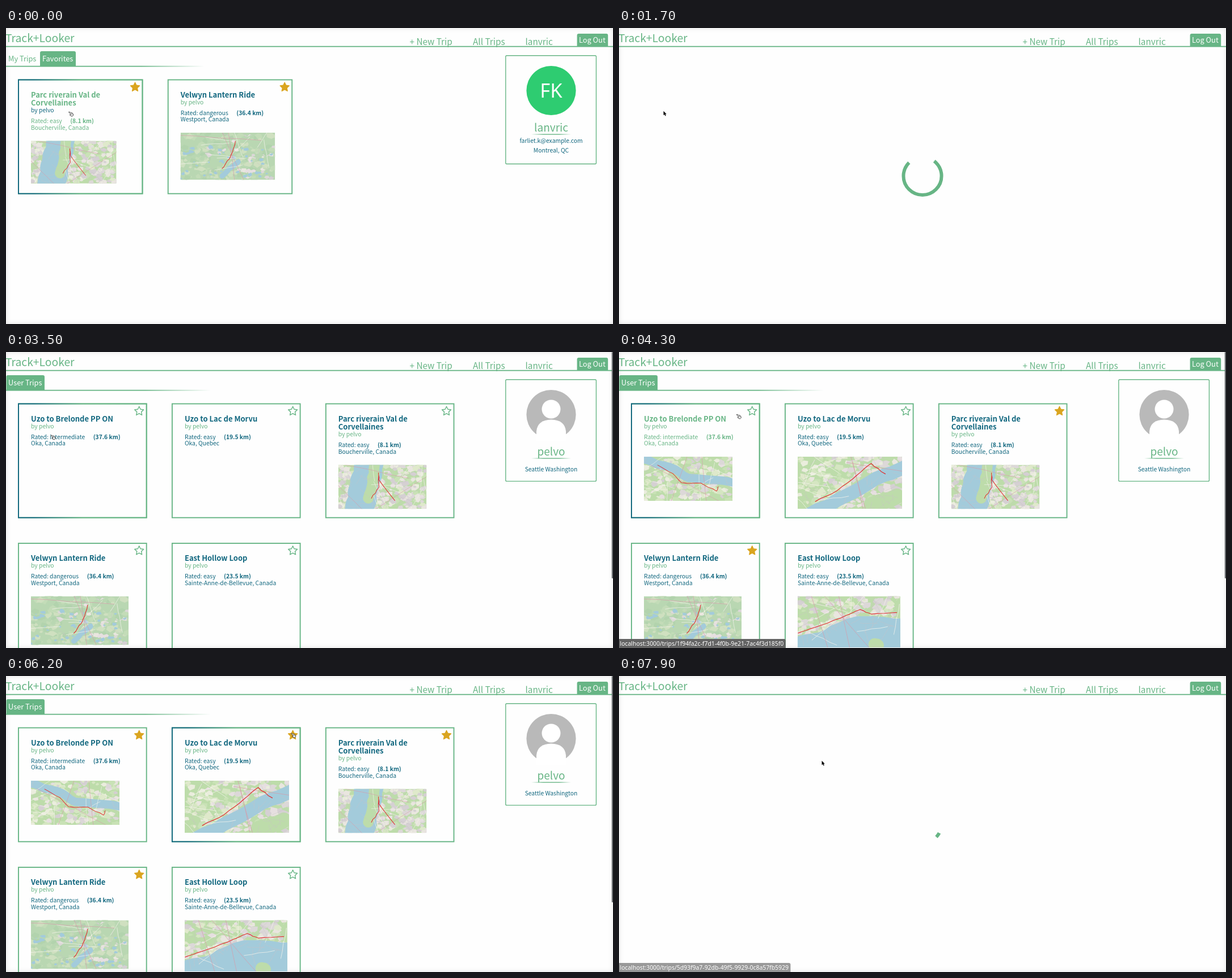
An HTML page for the animation above (8 s loop, 1070 by 523 pixels).

```html
<!DOCTYPE html>
<html lang="en">
<head>
<meta charset="utf-8">
<title>Trips</title>
<style>
  html, body { margin: 0; width: 100%; height: 100%; overflow: hidden; background: #fff; }
  #stage { width: 1070px; height: 523px; background: #fefefe; box-shadow: inset 0 0 10px rgba(0,0,0,.11); overflow: hidden; }
  svg { display: block; }
  text { font-family: "Noto Sans CJK JP", "Noto Sans CJK SC", "Noto Sans CJK", "Source Sans Pro", sans-serif; white-space: pre; }
  .bold { font-weight: 600; }
  .mid { text-anchor: middle; }
  .plain { font-family: "Noto Sans", "Open Sans", sans-serif; }
  .ink text { fill: var(--ink); }
</style>
</head>
<body>
<div id="stage"></div>
<script>
const GREEN = '#67b585', TEAL = '#11677f', GOLD = '#daa520';
const STEP = 100, LOOP = 8000;

// ---------- drawing helpers ----------
const text = (x, y, size, str, fill = GREEN, cls = '') =>
  `<text x="${x}" y="${y}" font-size="${size}" fill="${fill}" class="${cls}">${str}</text>`;
const box = (x, y, w, h, fill, extra = '') =>
  `<rect x="${x}" y="${y}" width="${w}" height="${h}" fill="${fill}" ${extra}/>`;
const circle = (x, y, r, fill) => `<circle cx="${x}" cy="${y}" r="${r}" fill="${fill}"/>`;
const group = (id, body, extra = '') => `<g id="${id}" ${extra}>${body}</g>`;

// ---------- maps ----------
let seed = 7;
const rnd = (a = 0, b = 1) => {
  seed = (seed * 16807) % 2147483647;
  return a + (b - a) * seed / 2147483647;
};
const pick = list => list[Math.floor(rnd(0, list.length))];
const repeat = (n, make) => Array.from({ length: n }, make).join('');

// Line through key points, each stretch broken up and shaken a little.
function line(color, width, keys, shake = 1) {
  const pts = keys.split(' ').map(s => s.split(',').map(Number));
  const out = pts.flatMap((a, i) => {
    const b = pts[i + 1];
    return b ? [0, .25, .5, .75].map(k =>
      [0, 1].map(d => (a[d] + (b[d] - a[d]) * k + (k ? rnd(-shake, shake) : 0)).toFixed(1))) : [a];
  });
  return `<polyline points="${out.join(' ')}" fill="none" stroke="${color}" stroke-width="${width}" stroke-linejoin="round" stroke-linecap="round"/>`;
}

function patch(color, x, y, r) {
  const turn = rnd(0, 2);
  const pts = [0, 1, 2, 3, 4].map(i => {
    const a = turn + i * Math.PI * .4, q = r * rnd(.5, 1.1);
    return `${(x + q * Math.cos(a)).toFixed(1)},${(y + q * .7 * Math.sin(a)).toFixed(1)}`;
  });
  return `<polygon points="${pts.join(' ')}" fill="${color}"/>`;
}

function road(color, width, length) {
  const x = rnd(0, 200), y = rnd(0, 100), a = rnd(0, 3.14);
  const dx = length * Math.cos(a), dy = length * Math.sin(a);
  return line(color, width, `${x - dx},${y - dy} ${x + dx},${y + dy}`);
}

const WATER = '#a3cbdb', WOOD = '#bddcaa';
const COUNTRY = [WOOD, '#c9e2b6', '#dfe9cb', '#eaeddd', '#d5e6c2'];
const TOWN = ['#dcd8d8', '#e6dfe0', '#d5d0d3', '#e9e6df'];
const LAKELAND = ['#b9d7b2', '#c3dcb8', '#b2d3ad', '#cfe0c0'];

// town: share of built-up land at the left and at the right edge.
function terrain(id, { land = COUNTRY, town, river, width, isle, isleWidth, ponds = 0, route }) {
  const ground = repeat(260, () => {
    const x = rnd(0, 200), share = town[0] + (town[1] - town[0]) * x / 200;
    return patch(pick(rnd() < share ? TOWN : land), x, rnd(0, 100), rnd(4, 12));
  });
  const streets = repeat(40 * (town[0] + town[1]), () => road('#c9c1c6', .5, rnd(6, 18))) +
    repeat(10, () => road('#f6f4ee', .8, 30)) + repeat(3, () => road('#d79aaa', .8, 90));
  return `<symbol id="${id}" viewBox="0 0 200 100">${box(0, 0, 200, 100, land[0])}${ground}` +
    (river ? line(WATER, width, river, 3) : '') + (isle ? line(WOOD, isleWidth, isle, 2) : '') +
    repeat(ponds, () => patch(WATER, rnd(0, 200), rnd(30, 100), rnd(1, 7))) +
    streets + line('#e03030', 1.3, route) + '</symbol>';
}

const maps =
  terrain('island', { town: [.7, .7], river: '72,-10 58,50 46,110', width: 64, isle: '82,0 78,40 68,76', isleWidth: 24,
    route: '75,76 92,51 91,18 92,34 128,81' }) +
  terrain('lakes', { land: LAKELAND, town: [0, .25], river: '88,92 122,62', width: 11, ponds: 60,
    route: '116,18 110,41 103,56 88,76' }) +
  terrain('valley', { town: [.2, .4], river: '-5,4 60,24 100,48 210,60', width: 19,
    route: '31,19 65,38 85,59 129,60 164,78 168,68' }) +
  terrain('delta', { town: [0, .9], river: '20,112 95,74 150,42 215,15', width: 26, isle: '142,92 190,76', isleWidth: 30,
    route: '34,86 76,65 114,35 141,13 168,33' }) +
  terrain('shore', { town: [.4, .8], river: '0,118 70,98 120,76 210,80', width: 74, isle: '150,94 156,96', isleWidth: 24,
    route: '1,72 33,61 83,43 122,26 144,35 193,32' });

// ---------- page parts ----------
const AUTHOR = 'pelvo', OWNER = 'lanvric';
const CARD_W = 227.7, HOME_W = 220.5, GAP = 43.2, ROW = 246.5;

const trip = (title, rating, km, place, map, mapW) => ({ title, rating, km, place, map, mapW });
const TRIPS = [
  trip(['Uzo to Brelonde PP ON'], 'intermediate', 37.6, 'Oka, Canada', 'valley', 156),
  trip(['Uzo to Lac de Morvu'], 'easy', 19.5, 'Oka, Quebec', 'delta', 184),
  trip(['Parc riverain Val de', 'Corvellaines'], 'easy', 8.1, 'Boucherville, Canada', 'island', 155.5),
  trip(['Velwyn Lantern Ride'], 'dangerous', 36.4, 'Westport, Canada', 'lakes', 172),
  trip(['East Hollow Loop'], 'easy', 23.5, 'Sainte-Anne-de-Bellevue, Canada', 'shore', 181)
];

const starPoints = Array.from({ length: 10 }, (_, i) => {
  const r = i % 2 ? 4.1 : 8.4, a = i * Math.PI / 5;
  return `${(r * Math.sin(a)).toFixed(2)},${(-r * Math.cos(a)).toFixed(2)}`;
}).join(' ');

// Cards fill rows of three; narrower cards scale their map down.
function card(prefix, t, i, w) {
  const x = 21 + (i % 3) * (w + GAP), y = 90.5 + Math.floor(i / 3) * ROW;
  const left = x + 23, low = y + (t.title.length - 1) * 14.4, mapW = t.mapW * w / CARD_W;
  const frame = `<rect x="${x + 1}" y="${y + 1}" width="${w - 2}" height="201.2" fill="none" stroke-width="1.9"`;
  return group(prefix + i,
    `${frame} stroke="${GREEN}"/>${frame} stroke="url(#edge)" class="edge"/>` +
    `<polygon class="star" points="${starPoints}" stroke-linejoin="round" stroke-width="1.4" transform="translate(${x + w - 14} ${y + 14.1})"/>` +
    '<g class="ink">' + t.title.map((s, n) => text(left, y + 32 + n * 14.4, 13, s, TEAL, 'bold')).join('') +
    text(left, low + 63.3, 10.3, `Rated: ${t.rating}<tspan class="bold" dx="14.5">(${t.km} km)</tspan>`) +
    text(left, low + 74.7, 10.3, t.place) + '</g>' +
    text(left, low + 44, 10.3, 'by ' + AUTHOR, GREEN, 'by') +
    `<use class="map" href="#${t.map}" x="${left}" y="${low + 94.5}" width="${mapW}" height="${mapW / 2}"/>`);
}

const profile = (h, name, lines, avatar) =>
  `<rect x="880.8" y="48.8" width="159.6" height="${h}" rx="2" fill="none" stroke="${GREEN}" stroke-width="1.4"/>` +
  avatar + text(961, 183, 19, name, GREEN, 'mid') + box(926, 187.2, 70, 1.4, 'url(#both)') +
  lines.map((s, i) => text(961, 214.2 + (i - lines.length / 2) * 17.5 + 6, 10.3, s, TEAL, 'mid')).join('');

const button = (x, y, w, h) => `<path d="M${x} ${y + h}v${3 - h}q0-3 3-3h${w - 6}q3 0 3 3v${h - 3}z" fill="${GREEN}"/>`;
const tabLine = w => box(0, 66.8, w, 1.8, 'url(#fade)');

const header = text(-1, 24.7, 19.3, 'Track+Looker') + text(711.5, 29.5, 15.3, '+ New Trip') +
  text(823, 29.5, 15.3, 'All Trips') + text(915.5, 29.5, 15.3, OWNER) +
  button(1006.6, 9.9, 54.6, 23) + text(1010, 26, 12.8, 'Log Out', '#fff') + box(0, 31.8, 1070, 1.8, GREEN);

const home = button(60, 41, 63, 27) + text(4, 59, 12.8, 'My Trips') + text(64, 59, 12.8, 'Favorites', '#fff') +
  tabLine(350) + [TRIPS[2], TRIPS[3]].map((t, i) => card('home', t, i, HOME_W)).join('') +
  profile(191.4, OWNER, ['farliet.k@example.com', 'Montreal, QC'],
    circle(961, 110.5, 43.6, '#2ecc71') + text(961, 122.8, 34.5, 'FK', '#fff', 'mid plain'));

const user = button(.5, 41, 67.5, 27) + text(4, 59, 12.8, 'User Trips', '#fff') + tabLine(361) +
  profile(179.6, AUTHOR, ['Seattle Washington'],
    circle(961, 110.5, 43.6, '#b9b9b9') + circle(961, 101, 16.5, '#fff') +
    '<path d="M935 157V140q2-20 26-20.5 24 .5 26 20.5V157z" fill="#fff"/>');

const cards = TRIPS.map((t, i) => card('trip', t, i, CARD_W)).join('') +
  box(1067.8, 0, 2.2, 400, '#66696c', 'rx="1"');

const gradient = (id, ...stops) => `<linearGradient id="${id}">` + stops.map(([at, color, alpha = 1]) =>
  `<stop offset="${at}" stop-color="${color}" stop-opacity="${alpha}"/>`).join('') + '</linearGradient>';

document.getElementById('stage').innerHTML = '<svg width="1070" height="523" viewBox="0 0 1070 523"><defs>' +
  gradient('edge', [.12, TEAL], [.5, GREEN]) +
  gradient('fade', [.68, GREEN], [1, GREEN, 0]) +
  gradient('both', [0, GREEN, 0], [.3, GREEN], [.7, GREEN], [1, GREEN, 0]) +
  maps + '</defs>' + header + group('home', home) + group('user', user) + group('cards', cards) +
  group('spin', `<circle id="arc" r="20.2" fill="none" stroke="${GREEN}" stroke-width="3.6"/>`) +
  group('status', '<path id="bar" fill="#646464"/>' + text(1.5, 519.3, 10.4, '', '#fff', 'plain')) +
  group('arrow', '<path d="M0 0V7.4L1.7 5.9 3 8.7 4.3 8.1 3.1 5.4H5.3z"/>') +
  group('hand', '<path d="M.4 .6Q1.5-.3 2.6 .6L4.6 2 6.4 1.7 8.4 4.2 8.8 6.2 6.8 8 4.2 7.4 2.3 5.3 4 5.2 3.3 3.4z" fill="#eee" stroke="#222" stroke-width=".8"/>' +
    '<path d="M4.6 3.4L6 5M5.8 2.8L7.2 4.4" stroke="#333" stroke-width=".6"/>') + '</svg>';

// ---------- timeline ----------
const $ = id => document.getElementById(id);
const show = (el, on) => { el.style.display = on ? '' : 'none'; };
const within = (t, [from, until]) => t >= from && t < until;
const clamp = v => Math.max(0, Math.min(1, v));
const ramp = (t, from, length) => clamp((t - from) / length);
const mix = (a, b, k) => 'rgb(' + [1, 3, 5].map(i => {
  const [p, q] = [a, b].map(c => parseInt(c.slice(i, i + 2), 16));
  return Math.round(p + (q - p) * k);
}) + ')';

const PAGE = { load: 900, user: 2100, cards: 3500, next: 7800 };

// Each move: start, duration, goal. The pointer slows down as it arrives.
const MOVES = [
  [0, 300, 78.5, 146.8], [4000, 500, 231, 103], [5000, 450, 502, 101],
  [6300, 800, 352.5, 153.8], [7200, 400, 357.5, 149.8]
];
function pointer(t) {
  return MOVES.reduce(([x, y], [from, length, gx, gy]) => {
    const k = 1 - (1 - ramp(t, from, length)) ** 2;
    return [x + (gx - x) * k, y + (gy - y) * k];
  }, [110, 148]);
}
const isArrow = t => within(t, [PAGE.load, PAGE.cards]) || within(t, [5200, 5400]) || t >= PAGE.next;

// Per card: frame lit, text lit, time of its star and of its map.
const FADE = 400;
const STATES = {
  home0: { frame: [0, LOOP], ink: [-FADE, LOOP], star: 0 },
  home1: { star: 0 },
  trip0: { frame: [PAGE.cards, 5200], ink: [PAGE.cards, 5200], star: 4500, map: 3700 },
  trip1: { frame: [5200, LOOP], ink: [6700, LOOP], star: 6000, map: 3800 },
  trip2: { star: 3600 },
  trip3: { star: 3600 },
  trip4: { star: LOOP, map: 3800 }
};
const LINKS = [
  { id: '0c2620b7-77b7-4d79-9743-9d5444e7d766', from: 400, until: PAGE.load },
  { id: '1f94fa2c-f7d1-4f0b-9e21-7ac4f3d185f0', from: 3700, until: 4400 },
  { id: '5d93f9a7-92db-49f5-9929-0c8a57fb5929', from: 6700, until: PAGE.next }
];
const SPINS = [
  { span: [PAGE.load, PAGE.user], born: 825 },
  { span: [PAGE.user, PAGE.cards], born: 2069 },
  { span: [PAGE.next, LOOP], born: 7797 }
];
const TURN = 1400;

const dash = $('arc').animate([
  { strokeDasharray: '1px 200px', strokeDashoffset: '0px', easing: 'ease-in-out' },
  { strokeDasharray: '100px 200px', strokeDashoffset: '-15px', easing: 'ease-in-out' },
  { strokeDasharray: '100px 200px', strokeDashoffset: '-125px' }
], { duration: TURN, iterations: Infinity });
dash.pause();

function drawCard(id, t) {
  const { frame, ink, star, map = 0 } = STATES[id];
  const el = $(id), mark = el.querySelector('.star'), gold = t >= star;
  const lit = ink ? ramp(t, ink[0], FADE) - ramp(t, ink[1], FADE) : 0;
  mark.setAttribute('fill', gold ? GOLD : '#fff');
  mark.setAttribute('stroke', gold ? GOLD : GREEN);
  show(el.querySelector('.edge'), frame && within(t, frame));
  show(el.querySelector('.map'), t >= map);
  el.style.setProperty('--ink', mix(TEAL, GREEN, lit));
}

function drawSpinner(t) {
  const spin = SPINS.find(s => within(t, s.span));
  show($('spin'), spin);
  if (!spin) return;
  const age = t - spin.born;
  dash.currentTime = age;
  $('spin').setAttribute('transform', `translate(535 261.5) scale(1.66) rotate(${age / TURN * 360})`);
}

function drawStatus(t) {
  const alpha = l => ramp(t, l.from, 200) - ramp(t, l.until, 285);
  const link = LINKS.find(l => alpha(l) > 0), status = $('status'), label = status.querySelector('text');
  show(status, link);
  if (!link) return;
  label.textContent = 'localhost:3000/trips/' + link.id;
  $('bar').setAttribute('d', `M0 507h${label.getComputedTextLength() + 2}q3 0 3 3v13H0z`);
  status.setAttribute('opacity', alpha(link));
}

function drawPointer(t) {
  const arrow = isArrow(t), [x, y] = pointer(t);
  show($('arrow'), arrow);
  show($('hand'), !arrow);
  $(arrow ? 'arrow' : 'hand').setAttribute('transform', `translate(${x} ${y})`);
}

function draw(t) {
  show($('home'), t < PAGE.load);
  show($('user'), within(t, [PAGE.user, PAGE.next]));
  show($('cards'), within(t, [PAGE.cards, PAGE.next]));
  Object.keys(STATES).forEach(id => drawCard(id, t));
  drawSpinner(t);
  drawStatus(t);
  drawPointer(t);
}

$('home0').querySelector('.by').setAttribute('fill', TEAL);
const start = performance.now();
let shown = -1;
function tick() {
  const step = Math.floor((performance.now() - start) % LOOP / STEP);
  if (step !== shown) draw((shown = step) * STEP);
  requestAnimationFrame(tick);
}
tick();
</script>
</body>
</html>
```
